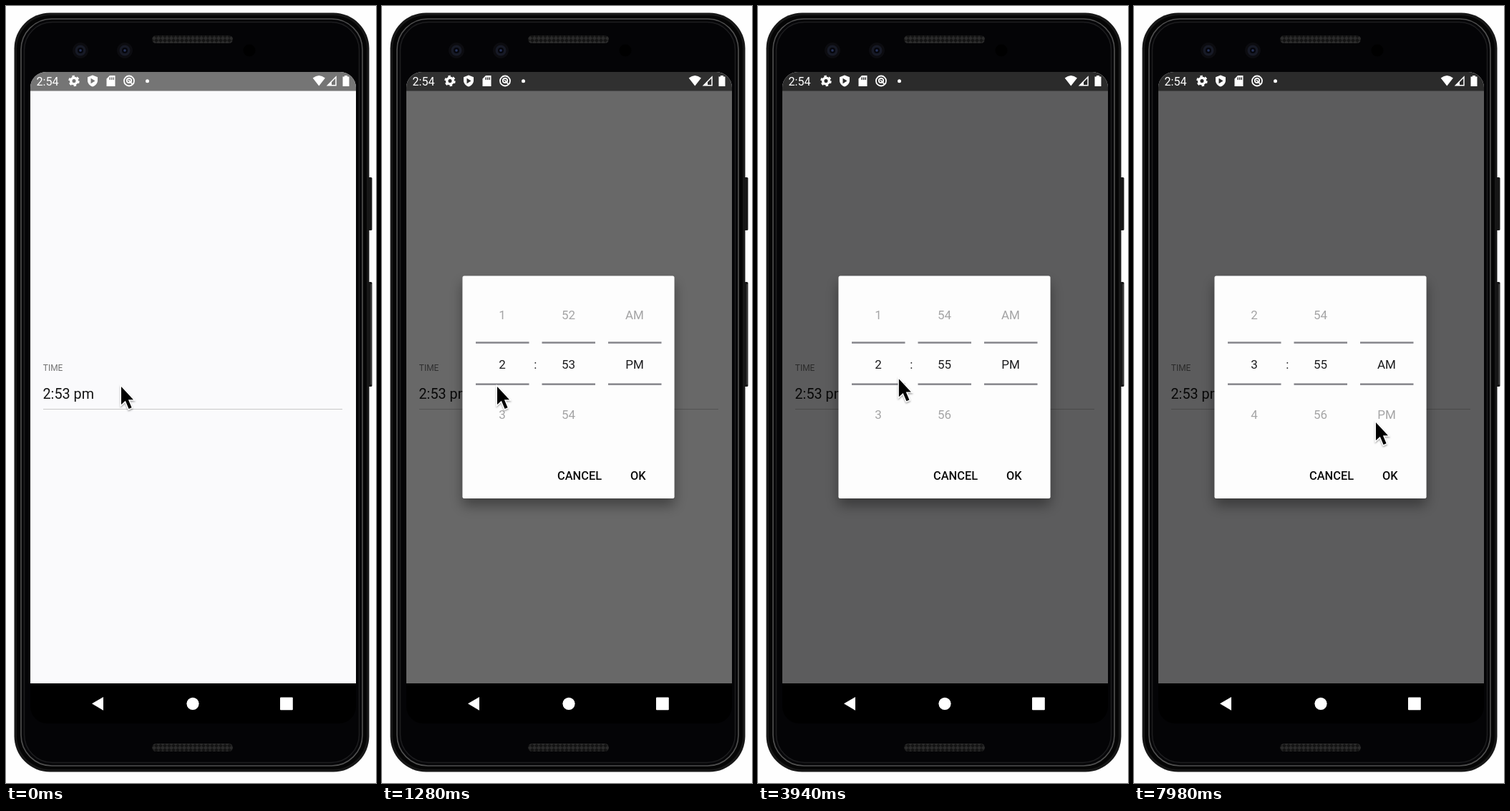
These frames come from a looping animation (517x1084 px, 8 s). An HTML page:

```html
<!DOCTYPE html>
<html lang="en">
<head>
<meta charset="utf-8">
<title>Time picker</title>
<style>
  html, body { margin: 0; width: 100%; height: 100%; overflow: hidden; background: #fefefe; }
  svg { display: block; width: 100%; height: 100%; }
  text { font-family: Roboto, Arial, sans-serif; }
  #picker text { font-size: 17px; fill: #1c1c1e; text-anchor: middle; }
  #picker .button { font-size: 16.4px; font-weight: 500; fill: #0c0c0c; }
</style>
</head>
<body>
<svg viewBox="0 0 517 1084">
  <defs>
    <clipPath id="screen"><path d="M34 945V114a22 22 0 0 1 22-22H467a22 22 0 0 1 22 22V945z"/></clipPath>
    <filter id="lift" x="-20%" y="-20%" width="140%" height="145%">
      <feDropShadow dx="0" dy="10" stdDeviation="9" flood-opacity=".38"/>
    </filter>
    <filter id="soft" x="-50%" y="-50%" width="200%" height="200%">
      <feDropShadow dx="0" dy="1.5" stdDeviation="1.3" flood-opacity=".4"/>
    </filter>
    <pattern id="mesh" width="6" height="6" patternUnits="userSpaceOnUse">
      <rect width="6" height="6" fill="#141414"/>
      <path d="M0 3l3-3 3 3-3 3z" fill="#2b2b2b"/>
    </pattern>
  </defs>

  <!-- phone body -->
  <g fill="#171717">
    <rect x="503" y="239" width="8.5" height="74" rx="1.5"/>
    <rect x="503" y="385" width="8.5" height="146" rx="1.5"/>
    <path d="M510 388v140" stroke="#555"/>
    <rect x="11.5" y="9.5" width="496" height="1059" rx="50"/>
  </g>
  <rect x="15" y="13" width="489" height="1052" rx="47" fill="#050505"/>
  <rect x="21" y="18" width="477" height="1042" rx="43" fill="#060608" stroke="#505050" stroke-width="1.6"/>
  <rect x="25.5" y="22.5" width="468" height="1033" rx="39" fill="#040406" stroke="#1d1d1f" stroke-width="1.5"/>
  <rect x="204" y="41" width="113" height="11" rx="5.5" fill="url(#mesh)"/>
  <rect x="204" y="1029" width="113" height="11" rx="5.5" fill="url(#mesh)"/>
  <g id="cameras"></g>
  <circle cx="340" cy="62" r="8.5"/>

  <!-- app -->
  <path d="M34 940H489V977a24 24 0 0 1-24 24H58a24 24 0 0 1-24-24z"/>
  <g clip-path="url(#screen)">
    <path d="M34 92H489V945H34z" fill="#fafafc"/>
    <path d="M34 92H489V118.500H34z" fill="#757575"/>
    <text x="51.800" y="508.800" font-size="11.900" fill="#707070">TIME</text>
    <text x="51.500" y="547.500" font-size="19.800" fill="#141414">2:53 pm</text>
    <path d="M52 562.500H470" stroke="#c8c8c8"/>
    <path id="scrim" d="M34 92H489V945H34z"/>
  </g>

  <!-- status bar and navigation -->
  <g fill="#fff">
    <text x="42.500" y="111" font-size="16.200">2:54</text>
    <circle cx="95" cy="104.500" r="4.300" fill="none" stroke="#fff" stroke-width="3.500"/>
    <circle cx="95" cy="104.500" r="6.500" fill="none" stroke="#fff" stroke-width="2.400" stroke-dasharray="3.400 3.407"/>
    <path fill-rule="evenodd" d="M121 96.500l7 2.800v4.700c0 4-3 7.200-7 8.500-4-1.300-7-4.500-7-8.500v-4.700zM118.500 100.800v7.400l6-3.700z"/>
    <path fill-rule="evenodd" d="M145 97h7.500v15H140.500V101.500zM144.500 99.500v3.500h1.400v-3.500zM147 99.500v3.500h1.400v-3.500zM149.500 99.500v3.500h1.400v-3.500z"/>
    <g fill="none" stroke="#fff" stroke-width="1.800">
      <circle cx="172" cy="104.500" r="7"/>
      <circle cx="172" cy="104" r="3.200"/>
      <path d="M171 103l6 6.500"/>
    </g>
    <circle cx="197.500" cy="104.700" r="2.500"/>
    <path d="M428.700 100.500q8.600-7 17.200 0L437.300 111.500z"/>
    <path d="M449.500 110.700H461V99z" fill="none" stroke="#fff" stroke-width="1.500"/>
    <path d="M455 105l0 6h-6z"/>
    <path d="M470.500 98.500h2.500v-1.500h4v1.500h2.500V112h-9z"/>
    <path d="M120 973.300L136 964V982.700z"/>
    <circle cx="261" cy="973.300" r="8.600"/>
    <rect x="383" y="964.500" width="17.800" height="17.800" rx="1"/>
  </g>

  <g id="picker">
    <rect x="112.500" y="376.500" width="296" height="310.500" rx="2.500" fill="#fdfdfd" filter="url(#lift)"/>
    <text x="214.300" y="505.500">:</text>
    <text class="button" x="276" y="661">CANCEL</text>
    <text class="button" x="357.800" y="661">OK</text>
  </g>

  <path id="cursor" filter="url(#soft)" stroke="#fff" stroke-width="2.600" paint-order="stroke"
        d="M0 0V25L5.800 19.700L10.600 31L14.600 29.300L9.900 18.300H17z"/>
</svg>
<script>
const LOOP = 8000, ROW = 69.5, MIDDLE = 500;
const $ = id => document.getElementById(id);
const clamp = v => Math.min(1, Math.max(0, v));

function add(parent, tag, attrs) {
  const node = document.createElementNS('http://www.w3.org/2000/svg', tag);
  for (const name in attrs) node.setAttribute(name, attrs[name]);
  return parent.appendChild(node);
}

// Monotone cubic through keys [time, value, ...]; `axis` picks the value.
function track(keys, t, axis = 1) {
  const last = keys.length - 1;
  if (t <= keys[0][0]) return keys[0][axis];
  if (t >= keys[last][0]) return keys[last][axis];
  const i = keys.findIndex(k => k[0] > t) - 1;
  const slope = n => (keys[n + 1][axis] - keys[n][axis]) / (keys[n + 1][0] - keys[n][0]);
  const tangent = n => {
    if (n === 0 || n === last) return 0;
    const a = slope(n - 1), b = slope(n);
    return a * b > 0 ? 2 * a * b / (a + b) : 0;
  };
  const span = keys[i + 1][0] - keys[i][0], u = (t - keys[i][0]) / span;
  const blend = u * u * (3 - 2 * u);
  return keys[i][axis] * (1 - blend) + keys[i + 1][axis] * blend
    + span * u * (1 - u) * (tangent(i) * (1 - u) - tangent(i + 1) * u);
}

const pointer = [
  [0, 161, 531], [1850, 161, 531], [2220, 206, 531], [2560, 260, 568],
  [2700, 262, 570], [3250, 255, 450], [3600, 253, 450], [3940, 197, 520],
  [4200, 168, 568], [4350, 168, 570], [4750, 172, 466], [5300, 172, 466],
  [6000, 345, 480], [6500, 352, 478], [6900, 338, 581]
];

const columns = [
  { x: 168, keys: [[4350, 0], [4750, .85], [5300, 1]], label: n => (n + 13) % 12 + 1 },
  { x: 260.5, keys: [[2700, 0], [3050, 1], [3250, 1.6], [3750, 2]], label: n => (n + 53) % 60 },
  { x: 353, keys: [[6500, 0], [6900, -.85], [7550, -1]], label: n => ['AM', 'PM'][n + 1] || '' }
];

for (const c of columns) {
  for (const y of [468.4, 526.4])
    add($('picker'), 'rect', { x: c.x - 37, y, width: 74.5, height: 2.5, fill: '#86868c' });
  c.items = [-2, -1, 0, 1, 2].map(step => ({ step, node: add($('picker'), 'text', { x: c.x }) }));
}

for (const cx of [104, 166])
  [[11, '#0c0c10'], [7.5, '#171a26'], [4, '#05060c'], [1.8, '#27345c']]
    .forEach(([r, fill]) => add($('cameras'), 'circle', { cx, cy: 62, r, fill }));

function draw(t) {
  $('scrim').setAttribute('opacity', .63 * clamp((t - 1030) / 270));
  $('picker').setAttribute('opacity', 1 - (1 - clamp((t - 1050) / 160)) ** 2);
  $('cursor').setAttribute('transform', `translate(${track(pointer, t)} ${track(pointer, t, 2)})`);
  for (const c of columns) {
    const scroll = track(c.keys, t), base = Math.round(scroll);
    for (const { step, node } of c.items) {
      const shift = (base + step - scroll) * ROW;
      node.textContent = c.label(base + step);
      node.setAttribute('y', MIDDLE + 6 + shift);
      node.setAttribute('opacity', clamp(1 - Math.abs(shift) / 114));
    }
  }
}

const start = performance.now();
(function tick() {
  draw((performance.now() - start) % LOOP);
  requestAnimationFrame(tick);
})();
</script>
</body>
</html>
```
